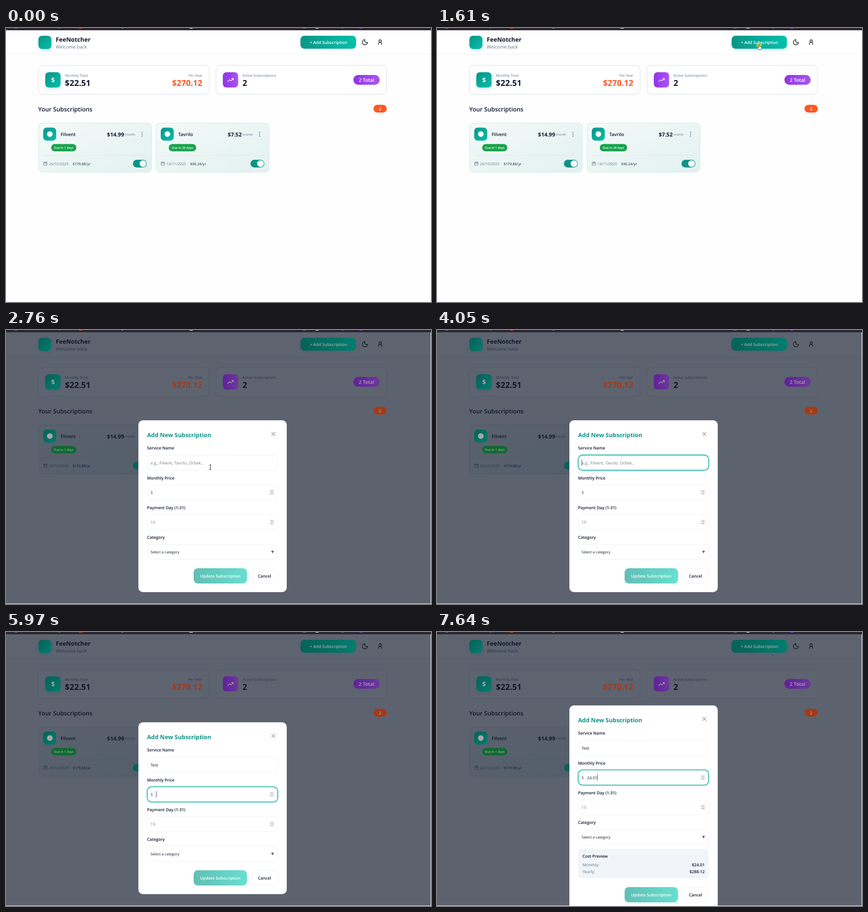
These frames come from a looping animation (931x601 px, 8 s). An HTML page:

```html
<!DOCTYPE html>
<html lang="en">
<head>
<meta charset="utf-8">
<title>Subscriptions</title>
<style>
html, body { margin: 0; width: 100%; height: 100%; overflow: hidden; background: #fff; }
svg { display: block; width: 100vw; height: 100vh; }
text { font-family: "Open Sans", "Noto Sans", sans-serif; fill: #0f172a; text-rendering: geometricPrecision; white-space: pre; }
.semi { font-weight: 600; }
.bold { font-weight: 700; }
.end { text-anchor: end; }
.mid { text-anchor: middle; }
.muted { fill: #64748b; }
.white { fill: #fff; }
.orange { fill: #ff5722; }
.s8 { font-size: 7.9px; }
.s9 { font-size: 9px; }
.s18 { font-size: 17.9px; }
.line { fill: none; stroke: #111; stroke-width: 1.3; stroke-linecap: round; stroke-linejoin: round; }
.stat { fill: #fff; stroke: #e2e6ef; stroke-width: 1.4; }
.field { fill: #fff; stroke: #eff1f5; }
.field.focus { stroke: #14a896; stroke-width: 1.3; filter: drop-shadow(0 0 1.5px #2dd4bf); }
.hint { fill: #757b85; }
.dimmed { filter: brightness(.65); }
#add { transform-origin: 706px 31px; }
</style>
</head>
<body>
<svg viewBox="0 0 931 601" preserveAspectRatio="none">
  <defs>
    <linearGradient id="teal" x2="1" y2="1"><stop stop-color="#0d9488"/><stop offset="1" stop-color="#03bfab"/></linearGradient>
    <linearGradient id="wide"><stop stop-color="#0a9686"/><stop offset="1" stop-color="#04c0ac"/></linearGradient>
    <linearGradient id="soft"><stop stop-color="#62bfb5"/><stop offset="1" stop-color="#67dfd0"/></linearGradient>
    <linearGradient id="violet"><stop stop-color="#9333ea"/><stop offset="1" stop-color="#a855f0"/></linearGradient>
    <linearGradient id="mint" x2="1" y2="1"><stop stop-color="#f3faf8"/><stop offset="1" stop-color="#e2f1f0"/></linearGradient>
    <filter id="glow" x="-50%" y="-50%" width="200%" height="200%"><feGaussianBlur stdDeviation="4"/></filter>
    <g id="spinner">
      <rect x="577" y="-6" width="11" height="12" rx="1" fill="#eceef0"/>
      <path d="M580.5-1.5l2-2 2 2M580.5 1.5l2 2 2-2" fill="none" stroke="#666b73" stroke-width=".9"/>
    </g>
  </defs>

  <rect width="931" height="601" fill="#fefefe"/>
  <rect y="5" width="931" height="52" fill="#fff"/>
  <path d="M0 57.5H931" stroke="#eceff2"/>
  <rect width="931" height="5" fill="#2b262f"/>
  <g id="specks"></g>

  <text class="bold" x="109" y="30" font-size="13.1">FeeNotcher</text>
  <text class="muted" x="109" y="45" font-size="10.2">Welcome back</text>
  <path class="line" d="M786.3 25.5a4.2 4.2 0 0 0 5.7 5.8 5.7 5.7 0 1 1-5.7-5.8z"/>
  <path class="line" d="M816 36.2v-1.4a3.5 3.5 0 0 1 7 0v1.4M822.2 28.6a2.6 2.6 0 1 1-5.2 0 2.6 2.6 0 0 1 5.2 0"/>

  <rect class="stat" x="71" y="82" width="374" height="63.5" rx="9"/>
  <rect class="stat" x="460" y="82" width="373.5" height="63.5" rx="9"/>
  <text class="muted s8" x="129" y="106.7">Monthly Total</text>
  <text class="bold s18" x="129" y="126.7">$22.51</text>
  <text class="muted s8 end" x="430" y="106.7">Per Year</text>
  <text class="muted s8" x="518" y="106.7">Active Subscriptions</text>
  <text class="bold s18" x="518" y="126.7">2</text>
  <text class="semi" x="70.5" y="182.7" font-size="13.2">Your Subscriptions</text>
  <g id="cards"></g>

  <rect id="shade" y="5" width="930" height="595" fill="#0f172a" opacity=".67"/>

  <g id="accents">
    <g filter="url(#glow)" fill="#0d9488" opacity=".22">
      <rect x="72" y="21" width="27" height="28" rx="8"/>
      <rect x="87" y="101" width="32" height="32" rx="8"/>
      <rect id="halo" x="647" y="20" width="119" height="28" rx="9"/>
    </g>
    <rect x="71" y="17" width="28.5" height="29" rx="8" fill="url(#teal)"/>
    <g id="add">
      <rect x="645" y="17" width="122" height="28.5" rx="8.5" fill="url(#wide)"/>
      <text class="semi white mid" x="706.5" y="35.2" font-size="9.1">+ Add Subscription</text>
    </g>
    <rect x="86" y="97" width="33.5" height="33.5" rx="8" fill="url(#teal)"/>
    <text class="bold white mid" x="103" y="118.8" font-size="14">$</text>
    <g id="trend">
      <rect x="475" y="97" width="33.5" height="33.5" rx="8" fill="url(#violet)"/>
      <path class="line" style="stroke:#fff" d="M485.8 117.5l4.1-4.1 2.7 2.7 5.2-5.3M494.2 110.6h3.7v3.7"/>
    </g>
    <text class="bold s18 orange end" x="430" y="126.7">$270.12</text>
    <rect x="761" y="103" width="57.5" height="21.5" rx="10.7" fill="url(#violet)"/>
    <text class="semi white mid" x="789.7" y="117.9" font-size="10.7">2 Total</text>
    <rect x="805" y="168.5" width="29" height="17" rx="8.5" class="orange"/>
    <text class="semi white mid s9" x="819.3" y="180.5">2</text>
    <g id="cardAccents"></g>
  </g>

  <path d="M930.5 5V601M0 600.5H931" stroke="#eef0f2"/>

  <g id="modal">
    <rect id="panel" x="290" y="198" width="325" height="377" rx="10" fill="#fff"/>
    <text class="bold" x="309" y="234.6" font-size="12.8" style="fill:#0d9488">Add New Subscription</text>
    <path class="line" style="stroke:#475569;stroke-width:1" d="M581.8 224l7.6 7.6m0-7.6l-7.6 7.6"/>
    <g class="semi s9">
      <text x="309" y="262.3">Service Name</text>
      <text x="309" y="327.6">Monthly Price</text>
      <text x="309" y="392.9">Payment Day (1-31)</text>
      <text x="309" y="458">Category</text>
    </g>
    <rect id="nameBox" class="field" x="309.5" y="274.5" width="285.5" height="33" rx="9.5"/>
    <rect id="priceBox" class="field" x="309.5" y="339.7" width="285.5" height="33" rx="9.5"/>
    <rect class="field" x="309.5" y="405" width="285.5" height="33" rx="9.5"/>
    <rect class="field" x="309.5" y="470.2" width="285.5" height="33" rx="9.5"/>
    <text id="nameHint" class="hint" x="316.8" y="294.7" font-size="9.07">e.g., Filvent, Tavrilo, Orbek...</text>
    <text id="name" x="316.8" y="294.7" font-size="8.75"></text>
    <text class="muted" x="316.6" y="360" font-size="9.6">$</text>
    <text id="price" x="328.8" y="360" font-size="8.75"></text>
    <text class="hint s9" x="316.8" y="425.3">15</text>
    <text x="316.8" y="490" font-size="8.05">Select a category</text>
    <path d="M580.8 484.3h6.2l-3.1 5.6z" fill="#555b66"/>
    <use href="#spinner" y="356"/>
    <use href="#spinner" y="421.5"/>
    <rect id="caret" width=".9" height="13.5" fill="#1e3a40"/>
    <g id="preview">
      <rect x="309" y="513" width="286.5" height="64" rx="8.5" fill="#f1f5f9"/>
      <text class="semi s9" x="318.7" y="532.3">Cost Preview</text>
      <text class="muted s9" x="318.7" y="551">Monthly:</text>
      <text class="muted s9" x="318.7" y="565.6">Yearly:</text>
      <text id="monthly" class="semi s9 end" x="586.3" y="551"></text>
      <text id="yearly" class="semi s9 end" x="586.3" y="565.6"></text>
    </g>
    <g id="footer">
      <rect x="411" y="522.5" width="117" height="33.5" rx="9" fill="url(#soft)"/>
      <text class="semi white mid s9" x="469.5" y="542.8">Update Subscription</text>
      <rect class="field" x="537.5" y="522.5" width="57.5" height="33" rx="9"/>
      <text class="semi mid s9" x="566.3" y="542.8">Cancel</text>
    </g>
  </g>

  <g id="cursor">
    <circle id="press" cy="3" r="6" fill="#ece52e" opacity=".65"/>
    <path id="arrow" d="M0 0V10.6L2.5 8.3 4.1 12 5.9 11.2 4.3 7.6H7.7Z" fill="#fff" stroke="#222" stroke-width=".7"/>
    <path id="hand" d="M-1 0.8q1-1.2 2 0V5l3.4.8q1.3.5 1.2 1.8L5 10 4.2 12H-.8L-3.6 8.2Q-4.4 6.6-2.8 6.7L-1 8Z" fill="#fff" stroke="#222" stroke-width=".8"/>
    <path id="beam" d="M-2-5.2h4M0-5.2V5.2M-2 5.2h4" fill="none" stroke="#222" stroke-width="1"/>
  </g>
</svg>
<script>
const $ = id => document.getElementById(id);
const show = (id, on) => $(id).style.display = on ? "" : "none";
const put = (id, text) => { if ($(id).textContent !== text) $(id).textContent = text; };
const move = (id, x, y) => $(id).setAttribute("transform", `translate(${x} ${y})`);

const plans = [
  { x: 71, name: "Filvent", cost: "14.99", year: "179.88", due: "1", date: "26/10/2025", pill: 55 },
  { x: 328.5, name: "Tavrilo", cost: "7.52", year: "90.24", due: "20", date: "14/11/2025", pill: 60 }
];

const cardBase = p => `<g transform="translate(${p.x} 208)">
  <rect x=".5" y=".5" width="247" height="107.5" rx="8.5" fill="url(#mint)" stroke="#c8e9e4"/>
  <path d="M11 71.5H237" stroke="#dcebe9"/>
  <text class="semi" x="48.7" y="29.3" font-size="10.2">${p.name}</text>
  <text class="bold end" x="187.7" y="29.8" font-size="11.9">$${p.cost}</text>
  <text class="muted" x="188.5" y="28" font-size="6.75">/month</text>
  <g fill="#475569"><circle cx="227" cy="21" r="1.1"/><circle cx="227" cy="25" r="1.1"/><circle cx="227" cy="29" r="1.1"/></g>
  <path class="line" style="stroke:#64748b;stroke-width:.9" d="M11.8 86.5h7v6.5h-7zM11.8 88.7h7M13.7 85.3v1.5M17 85.3v1.5"/>
  <text class="muted" x="23" y="92.8" font-size="8.1">${p.date}</text>
  <text class="semi" x="75" y="92.8" font-size="7.75" style="fill:#475569">$${p.year}/yr</text>
</g>`;

const cardAccent = p => `<g transform="translate(${p.x} 208)">
  <rect x="10.5" y="10.5" width="28.5" height="28.5" rx="7.5" fill="url(#teal)"/>
  <circle cx="25" cy="24.7" r="6.2" fill="#fff"/>
  <rect x="28" y="46.5" width="${p.pill}" height="16" rx="8" fill="#16a34a"/>
  <text class="semi white mid" x="${28 + p.pill / 2}" y="57" font-size="6.7">Due in ${p.due} days</text>
  <rect x="207" y="81" width="30.5" height="17" rx="8.5" fill="#0d9488"/>
  <circle cx="229" cy="89.5" r="7.3" fill="#fff"/>
</g>`;

$("cards").innerHTML = plans.map(cardBase).join("");
$("cardAccents").innerHTML = plans.map(cardAccent).join("");
$("specks").innerHTML = [[160, "#e8502d"], [402, "#f4f4f4"], [678, "#e8e8e8"], [774, "#9333ea"], [253, "#8b8790"], [18, "#6d6872"], [115, "#6d6872"], [650, "#77727c"], [735, "#77727c"]]
  .map(([x, c]) => `<rect x="${x}" width="${x % 2 ? 4 : 7}" height="1.2" fill="${c}"/>`).join("");

// Pointer moves: start, end, updates, cubic control points
const moves = [
  [70, 810, 11, [[894, 594], [880, 420], [845, 230], [808, 76]]],
  [810, 1210, 6, [[808, 76], [775, 50], [730, 34], [705.5, 35.5]]],
  [1950, 2760, 12, [[705.5, 35.5], [640, 250], [520, 380], [447.5, 301]]],
  [2760, 3110, 5, [[447.5, 301], [446, 296], [443, 292], [442, 291]]]
];
const ease = [p => p, p => 1 - (1 - p) ** 2, p => (1 - Math.cos(Math.PI * p)) / 2, p => p];

function pointer(t) {
  let i = moves.length - 1;
  while (i && t < moves[i][0]) i--;
  const [from, to, n, pts] = moves[i];
  const raw = Math.min(1, Math.max(0, (t - from) / (to - from)));
  const p = ease[i](Math.floor(raw * n + 1e-6) / n), q = 1 - p;
  return [0, 1].map(k => q ** 3 * pts[0][k] + 3 * q * q * p * pts[1][k] + 3 * q * p * p * pts[2][k] + p ** 3 * pts[3][k]);
}

const typed = (text, times, t) => text.slice(0, times.filter(k => t >= k).length);

function render(t) {
  const open = t >= 1680, grown = t >= 6370;
  const [x, y] = pointer(t);

  show("shade", open);
  show("modal", open);
  $("accents").setAttribute("class", open ? "dimmed" : "");

  const over = !open && x > 645 && x < 767 && y < 46;
  const pressed = over && t >= 1540;
  $("add").style.transform = `scale(${pressed ? .993 : over ? 1.015 : 1})`;
  $("halo").setAttribute("opacity", over ? 1.6 : .3);
  $("trend").setAttribute("opacity", !open && t >= 70 && y > 82 && y < 146 && x > 460 && x < 834 ? .92 : 1);

  const name = typed("Test", [4110, 4310, 4410, 4510], t);
  const price = typed("24.01", [6370, 6700, 7110, 7370, 7640], t);
  put("name", name);
  put("price", price);
  show("nameHint", !name);

  const onPrice = t >= 4910, focused = t >= 3110;
  $("nameBox").setAttribute("class", focused && !onPrice ? "field focus" : "field");
  $("priceBox").setAttribute("class", onPrice ? "field focus" : "field");
  show("caret", focused && !(t >= 3640 && t < 4050) && !(t >= 5440 && t < 5970));
  const input = $(onPrice ? "price" : "name");
  const width = open && input.textContent ? input.getComputedTextLength() : 0;
  $("caret").setAttribute("x", +input.getAttribute("x") + width);
  $("caret").setAttribute("y", onPrice ? 349.3 : 284.3);

  const sum = parseFloat(price) || 0;
  put("monthly", "$" + sum.toFixed(2));
  put("yearly", "$" + (sum * 12).toFixed(2));
  show("preview", grown);
  move("modal", 0, grown ? -37 : 0);
  move("footer", 0, grown ? 74 : 0);
  $("panel").setAttribute("height", grown ? 451 : 377);

  const inField = open && x > 309 && x < 595 && y > 274 && y < 308;
  show("cursor", t >= 70 && t < 4050);
  move("cursor", x, y);
  show("press", pressed || (t >= 3040 && t < 3180));
  show("hand", over);
  show("beam", inField);
  show("arrow", !over && !inField);
}

const start = performance.now();
function tick() {
  render((performance.now() - start) % 8000);
  requestAnimationFrame(tick);
}
tick();
</script>
</body>
</html>
```
